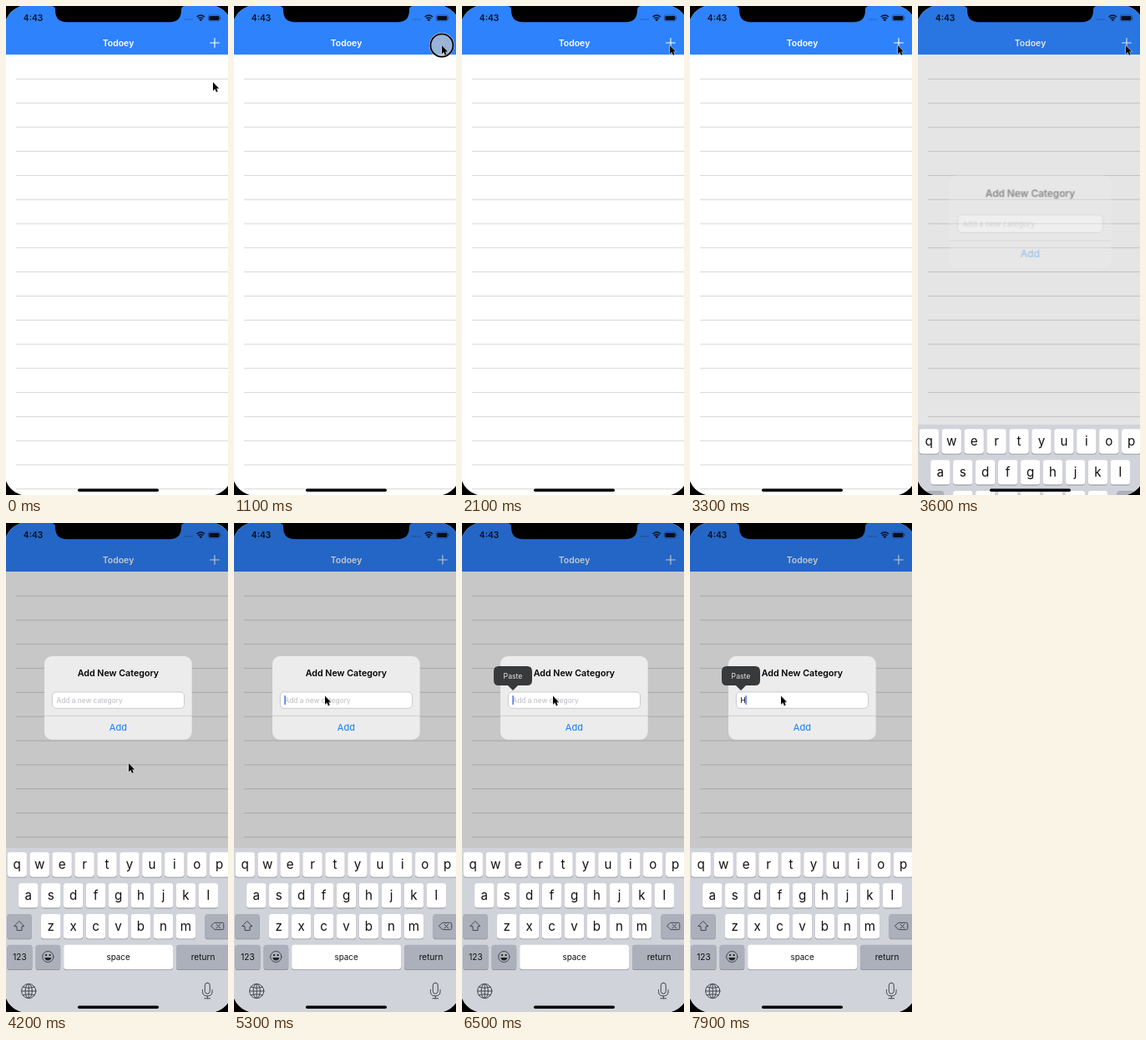
Animation, 266 px wide and 584 px high, one loop 8 s. Source, as an HTML page:

```html
<!DOCTYPE html>
<html lang="en">
<head>
<meta charset="utf-8">
<title>Add category</title>
<style>
html, body { margin: 0; width: 100%; height: 100%; overflow: hidden; background: #000; }
svg { display: block; width: 100vw; height: 100vh; }
text { font-family: Inter, "Liberation Sans", sans-serif; text-anchor: middle; }
.left { text-anchor: start; }
.line { fill: none; stroke: #44474d; stroke-width: 1; stroke-linecap: round; stroke-linejoin: round; }
.semi { font-weight: 600; }

.anim { animation: 8s linear infinite; }
#cursor { animation-name: move; }
#ring { animation-name: tap; }
#plus { animation-name: press; }
#dim { animation-name: dim; animation-timing-function: step-end; }
#alert { animation-name: alert; animation-timing-function: step-end; transform-origin: 134px 208.5px; }
#keyboard { animation-name: rise; animation-timing-function: step-end; }
#hint { animation-name: hint; animation-timing-function: step-end; }
#typed { animation-name: typed; animation-timing-function: step-end; }
#caret { animation-name: caret; animation-timing-function: step-end; }
#paste { animation-name: paste; }

@keyframes move {
  0%, 2% { transform: translate(248px, 91px); animation-timing-function: ease-in-out; }
  7.5%, 46.9% { transform: translate(249px, 47px); animation-timing-function: ease-in-out; }
  52.4%, 55.5% { transform: translate(147px, 287px); animation-timing-function: ease-in-out; }
  65%, 100% { transform: translate(109px, 206.5px); }
}
@keyframes tap {
  0%, 9.8% { opacity: 0; }
  10%, 16% { opacity: 1; }
  20%, 68.6% { opacity: 0; }
  68.8%, 72% { opacity: 1; }
  75%, 100% { opacity: 0; }
}
@keyframes press {
  0%, 9.8% { opacity: 1; }
  10%, 16% { opacity: .15; }
  20%, 100% { opacity: 1; }
}
@keyframes dim {
  0% { opacity: 0; }
  44.85% { opacity: .1; }
  46.1% { opacity: .2; }
  47.35%, 100% { opacity: .22; }
}
@keyframes alert {
  0% { opacity: 0; transform: none; }
  44.85% { opacity: .4; transform: translateY(48px) scale(1.1); }
  46.1% { opacity: .94; transform: translateY(8.5px) scale(1.017); }
  47.35% { opacity: 1; transform: translateY(1px) scale(1.002); }
  48.6%, 100% { opacity: 1; transform: none; }
}
@keyframes rise {
  0% { transform: translateY(200px); }
  44.85% { transform: translateY(112px); }
  46.1% { transform: translateY(19px); }
  47.35% { transform: translateY(2.5px); }
  48.6%, 100% { transform: none; }
}
@keyframes hint { 0% { opacity: 1; } 98.6%, 100% { opacity: 0; } }
@keyframes typed { 0% { opacity: 0; } 98.6%, 100% { opacity: 1; } }
@keyframes caret {
  0% { opacity: 0; transform: none; }
  53.6% { opacity: 1; }
  59.9% { opacity: 0; }
  66.1% { opacity: 1; }
  72.4% { opacity: 0; }
  78.6% { opacity: 1; }
  84.9% { opacity: 0; }
  91.1% { opacity: 1; }
  97.4% { opacity: 0; transform: none; }
  98.6%, 100% { opacity: 1; transform: translateX(6px); }
}
@keyframes paste { 0%, 74.5% { opacity: 0; } 77%, 100% { opacity: 1; } }
</style>
</head>
<body>
<svg viewBox="0 0 266 584">
  <defs>
    <clipPath id="screen"><rect x="-2" y="-1" width="273" height="586" rx="28"/></clipPath>
  </defs>
  <rect width="266" height="584"/>

  <g clip-path="url(#screen)">
    <rect x="-2" y="-1" width="273" height="586" fill="#fff"/>
    <path id="rows" fill="none" stroke="#c4c4c6" stroke-width=".7"/>
    <rect x="-2" y="-1" width="273" height="59" fill="#2e82fc"/>

    <!-- status bar -->
    <g fill="#07101f">
      <text class="semi" x="32.5" y="18" font-size="10.2">4:43</text>
      <path d="M213.5 16h10" stroke="#2a5fae" stroke-width="1.6" stroke-dasharray="1.6 1.3" fill="none"/>
      <path d="M233.3 18.2 231.3 16.2Q233.3 14.6 235.3 16.2Z"/>
      <path d="M228.6 13.1Q233.3 8.9 238 13.1M230.2 15Q233.3 12.3 236.4 15" fill="none" stroke="#07101f" stroke-width="1.4"/>
      <rect x="242.4" y="10.9" width="14" height="7" rx="2" fill="none" stroke="#07101f" stroke-opacity=".5" stroke-width=".7"/>
      <rect x="243.4" y="11.9" width="12" height="5" rx="1.1"/>
      <path d="M257.2 13.2q1.3 1.2 0 2.4z" opacity=".6"/>
    </g>

    <text class="semi" x="134.5" y="47.8" font-size="10.5" fill="#fff">Todoey</text>
    <path id="plus" class="anim" d="M244.2 44h11.6M250 38.2v11.6" stroke="#fff" stroke-width="1.1"/>

    <rect id="dim" class="anim" x="-2" y="-1" width="273" height="586"/>

    <g id="alert" class="anim">
      <rect x="46" y="159" width="176.7" height="99.7" rx="9" fill="#ececed"/>
      <text class="semi" x="134.4" y="183" font-size="10.7">Add New Category</text>
      <rect x="55.4" y="201.9" width="158.2" height="19.4" rx="4.6" fill="#fff" stroke="#bfbfc2" stroke-width=".8"/>
      <text id="hint" class="left anim" x="60.4" y="214.8" font-size="8.35" fill="#bcbcc0">Add a new category</text>
      <text id="typed" class="left anim" x="60.4" y="214.8" font-size="8.35">H</text>
      <rect id="caret" class="anim" x="60.4" y="206" width="1.4" height="11" rx=".6" fill="#3f6bf0"/>
      <path d="M46 230.3H222.7" stroke="#c3c3c7" stroke-width=".7"/>
      <text x="134.4" y="248" font-size="11" fill="#0f7bff">Add</text>
    </g>

    <g id="paste" class="anim">
      <path d="M44 171H78Q84 171 84 177V188Q84 194 78 194H67L61 200 55 194H44Q38 194 38 188V177Q38 171 44 171Z" fill="#38393b"/>
      <text x="61" y="185.6" font-size="8.7" fill="#e4e4e5">Paste</text>
    </g>

    <g id="keyboard" class="anim">
      <rect x="-2" y="388" width="273" height="200" fill="#d0d3da"/>
      <g id="keys"></g>
      <path class="line" d="M16 494.2 22 500.2H19V505H13V500.2H10Z" transform="translate(0 -18.5)" stroke="#222"/>
      <path class="line" d="M250 477.4h9.5q1.3 0 1.3 1.3v5.6q0 1.3-1.3 1.3h-9.5l-4.3-4.1zM252.2 479.3l4.6 4.6M256.8 479.3l-4.6 4.6" stroke="#222"/>
      <g transform="translate(50.3 518)">
        <circle class="line" r="6.6" stroke="#222"/>
        <circle cx="-2.3" cy="-2" r="1"/><circle cx="2.3" cy="-2" r="1"/>
        <path d="M-4 1H4Q3.2 4.6 0 4.6T-4 1Z" fill="#222"/>
      </g>
      <g class="line" transform="translate(27.2 559)">
        <circle r="8.6"/><ellipse rx="4.1" ry="8.6"/>
        <path d="M0-8.6V8.6M-8.6 0H8.6M-7-4.7Q0-2.4 7-4.7M-7 4.7Q0 2.4 7 4.7"/>
      </g>
      <g class="line" transform="translate(241.3 558.5)">
        <rect x="-3" y="-9.3" width="6" height="13" rx="3"/>
        <path d="M-5.8-1V1.2Q-5.8 6.4 0 6.4T5.8 1.2V-1M0 6.4V9.3M-3.4 9.3H3.4"/>
      </g>
    </g>
  </g>

  <!-- notch and home indicator -->
  <path d="M54 0Q59 0 59 4.5V5Q59 19.2 73 19.2H196Q210 19.2 210 5V4.5Q210 0 215 0Z"/>
  <rect x="86" y="576.6" width="97" height="3.4" rx="1.7"/>

  <g id="cursor" class="anim">
    <g id="ring" class="anim">
      <circle r="14.2" fill="#c8c8c8" fill-opacity=".7" stroke="#f4f6f8" stroke-width="1.6"/>
      <circle r="13.6" fill="none" stroke="#000" stroke-width="1.9"/>
    </g>
    <path d="M0 0V10.2L2.3 8.1 4 11.8 5.8 11 4.2 7.4H7.3Z" stroke="#fff" stroke-width=".9" paint-order="stroke"/>
  </g>
</svg>

<script>
const rows = Array.from({ length: 18 }, (_, i) => `M12 ${(87.2 + 28.8 * i).toFixed(1)}H266`);
document.getElementById('rows').setAttribute('d', rows.join(''));

const pitch = 26.95;
const light = '#fff', dark = '#abb0bb';

function key(x, y, w, fill, label = '', size = 10, drop = 3.6) {
  const box = (dy, color) =>
    `<rect x="${x}" y="${y + dy}" width="${w}" height="29.4" rx="3.4" fill="${color}"/>`;
  return box(0.9, '#8b8e94') + box(0, fill) +
    `<text x="${x + w / 2}" y="${y + 14.7 + drop}" font-size="${size}" fill="#111">${label}</text>`;
}

const letterRow = (letters, center, y) => [...letters].map((c, i) =>
  key(center + i * pitch - 11.7, y, 23.4, light, c, 15.2, 4.8)).join('');

document.getElementById('keys').innerHTML =
  letterRow('qwertyuiop', 13.2, 393.3) +
  letterRow('asdfghjkl', 26.8, 430.2) +
  letterRow('zxcvbnm', 53.7, 467) +
  key(1.3, 467, 29.5, dark) +
  key(238.5, 467, 29.5, dark) +
  key(1.3, 503.8, 30.2, dark, '123') +
  key(35.6, 503.8, 29.6, dark) +
  key(69.2, 503.8, 130.8, light, 'space', 9.9) +
  key(204, 503.8, 64, dark, 'return', 10.1);
</script>
</body>
</html>
```
